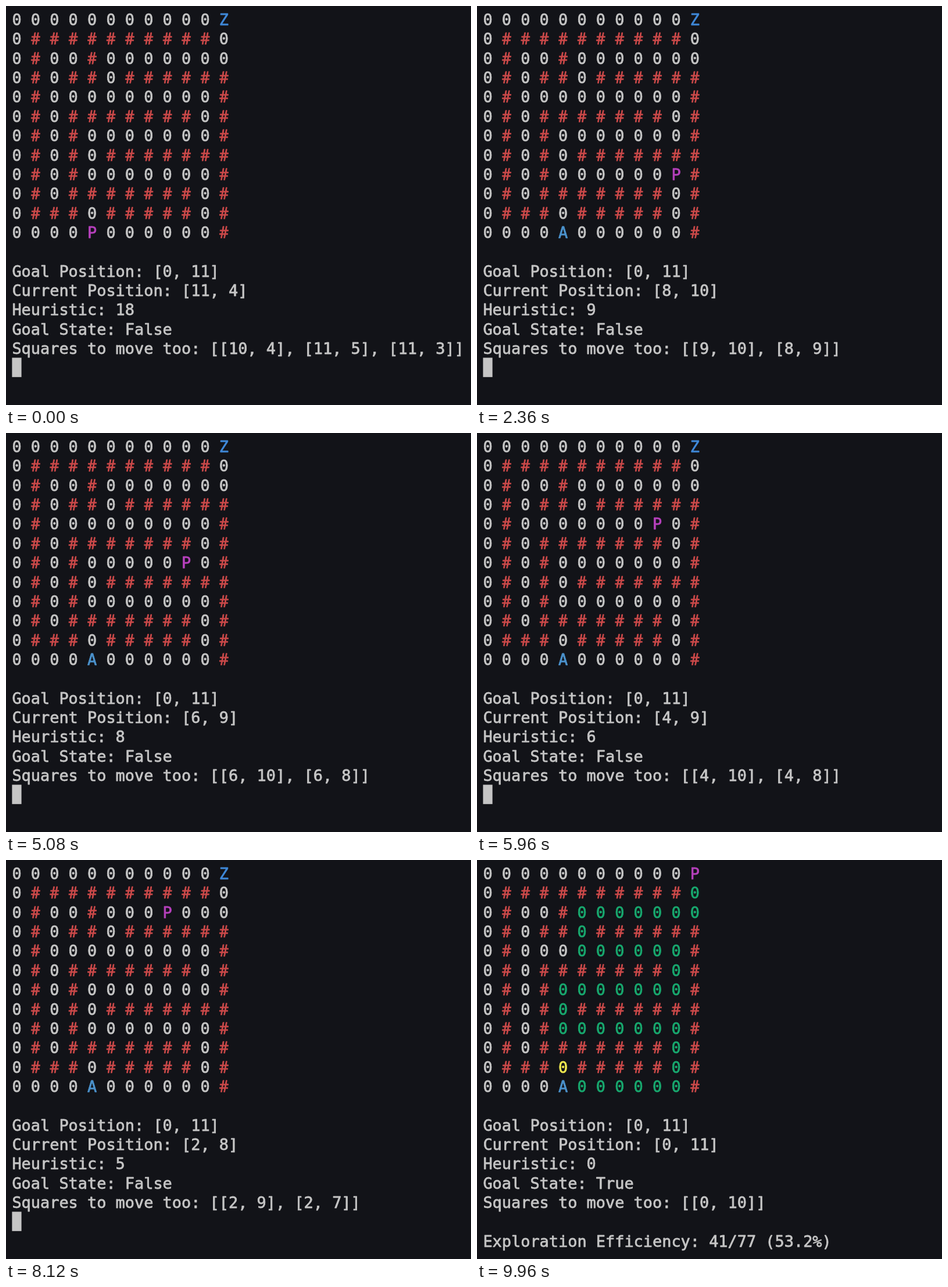
An HTML page with a canvas for the animation above (10 s loop, 800 by 688 pixels).

```html
<!DOCTYPE html>
<html lang="en">
<head>
<meta charset="utf-8">
<title>Maze search</title>
<style>
html, body { margin: 0; width: 100%; height: 100%; overflow: hidden; background: #121318; }
canvas { display: block; }
</style>
</head>
<body>
<canvas id="stage" width="800" height="688"></canvas>
<script>
const ctx = document.getElementById('stage').getContext('2d');
const LOOP = 10000, FIRST = 192, STEP = 221;
const LEFT = 10.4, TOP = 6.5, CHAR = 16.2, LINE = 33.36, BASE = 26.5;
const TEXT_FONT = '26.91px "DejaVu Sans Mono", monospace';
const WALL_FONT = '500 27px "Noto Sans Mono", monospace';
const color = {
  back: '#121318', text: '#c5c5c5', wall: '#cd4a4a', start: '#4b92cc',
  goal: '#3f88d8', player: '#b640bc', path: '#18a86e', dead: '#efe84f'
};

const maze = [
  '000000000000',
  '0##########0',
  '0#00#0000000',
  '0#0##0######',
  '0#000000000#',
  '0#0#######0#',
  '0#0#0000000#',
  '0#0#0#######',
  '0#0#0000000#',
  '0#0#######0#',
  '0###0#####0#',
  '00000000000#'
];
const start = [11, 4], goal = [0, 11], deadEnd = [10, 4];
const corners = [start, [11, 10], [8, 10], [8, 4], [6, 4], [6, 10],
  [4, 10], [4, 5], [2, 5], [2, 11], goal];

const same = (a, b) => a[0] === b[0] && a[1] === b[1];
const show = p => `[${p.join(', ')}]`;

// Walk cell by cell from corner to corner.
const path = [start];
for (const corner of corners) {
  let at = path[path.length - 1];
  while (!same(at, corner)) {
    at = at.map((v, i) => v + Math.sign(corner[i] - v));
    path.push(at);
  }
}
const visits = [start, deadEnd, ...path.slice(1)];

function neighbours([r, c]) {
  const around = [[r - 1, c], [r, c + 1]];
  if (r > 0) around.push([r + 1, c]);
  around.push([r, c - 1]);
  return around.filter(([y, x]) => maze[y]?.[x] === '0');
}

function write(text, row, col, fill) {
  const x = LEFT + col * CHAR, y = TOP + row * LINE + BASE;
  ctx.font = text === '#' ? WALL_FONT : TEXT_FONT;
  ctx.fillStyle = ctx.strokeStyle = fill;
  ctx.fillText(text, x, y);
  ctx.strokeText(text, x, y);
}

function cell(pos, player, done) {
  if (same(pos, player)) return ['P', color.player];
  if (same(pos, start)) return ['A', color.start];
  if (same(pos, goal)) return ['Z', color.goal];
  const mark = maze[pos[0]][pos[1]];
  if (mark === '#') return [mark, color.wall];
  if (done && same(pos, deadEnd)) return [mark, color.dead];
  if (done && path.some(p => same(p, pos))) return [mark, color.path];
  return [mark, color.text];
}

function draw(time) {
  const index = Math.max(0, Math.floor((time - FIRST) / STEP) + 1);
  const player = visits[Math.min(index, visits.length - 1)];
  const done = same(player, goal);

  ctx.fillStyle = color.back;
  ctx.fillRect(0, 0, 800, 688);
  ctx.lineWidth = 0.8;
  ctx.lineJoin = 'round';

  maze.forEach((line, r) => [...line].forEach((_, c) => {
    const [mark, fill] = cell([r, c], player, done);
    write(mark, r, c * 2, fill);
  }));

  const distance = Math.abs(goal[0] - player[0]) + Math.abs(goal[1] - player[1]);
  [
    `Goal Position: ${show(goal)}`,
    `Current Position: ${show(player)}`,
    `Heuristic: ${distance}`,
    `Goal State: ${done ? 'True' : 'False'}`,
    `Squares to move too: [${neighbours(player).map(show).join(', ')}]`
  ].forEach((line, i) => write(line, 13 + i, 0, color.text));

  if (done) {
    const seen = visits.length - 1, open = 77;
    write(`Exploration Efficiency: ${seen}/${open} (${(100 * seen / open).toFixed(1)}%)`,
      19, 0, color.text);
  } else {
    ctx.fillStyle = color.text;
    ctx.fillRect(LEFT, TOP + 18 * LINE - 0.5, CHAR, LINE);
  }
}

const began = performance.now();
function tick() {
  draw((performance.now() - began) % LOOP);
  requestAnimationFrame(tick);
}
tick();
</script>
</body>
</html>
```
